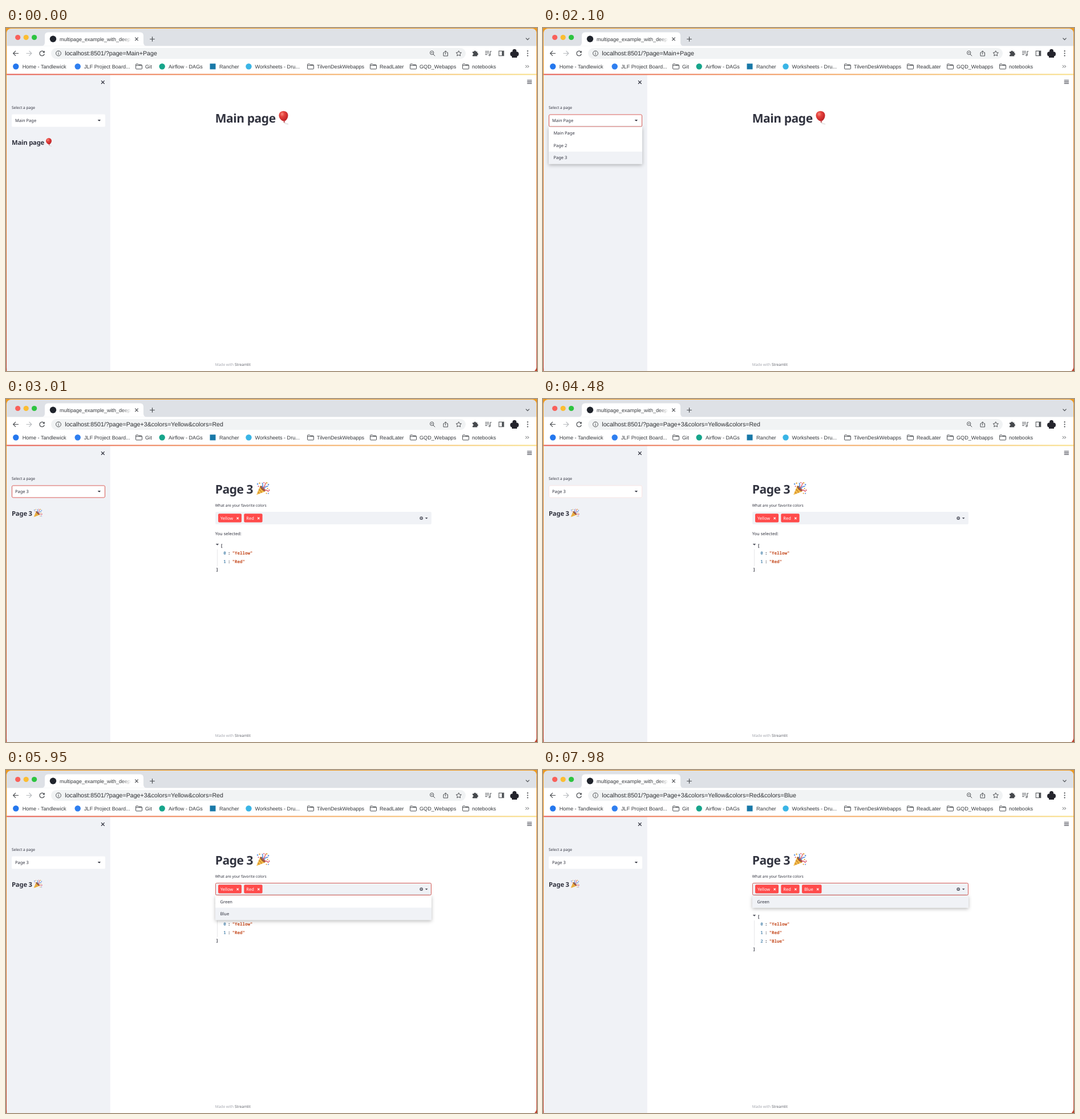
These frames come from a looping animation (931 px wide and 602 px high, 8 s). An HTML page:

```html
<!DOCTYPE html>
<html lang="en">
<head>
<meta charset="utf-8">
<title>Multipage app</title>
<style>
  html, body { margin: 0; width: 100%; height: 100%; overflow: hidden; }
  svg { display: block; width: 931px; height: 602px; }
  text { text-rendering: geometricPrecision; white-space: pre; }
  .chrome { font: 9.15px "Liberation Sans", sans-serif; fill: #36393d; }
  .page { font: 7.5px "Noto Sans", sans-serif; fill: #31333f; }
  .title, .subtitle { font-weight: 700; letter-spacing: -.02em; }
  .title { font-size: 21px; }
  .subtitle { font-size: 11.3px; }
  .label { font-size: 6.6px; }
  .tag { font-weight: 500; fill: #fff; }
  .json { font: 600 7.5px "Noto Sans Mono", monospace; }
  .icon { fill: none; stroke: #4b4e52; }
  .menu { filter: drop-shadow(0 2px 3px rgba(0, 0, 0, .27)); }
  .focus { fill: none; stroke: #d65b56; }
</style>
</head>
<body>
<svg viewBox="0 0 931 602">
  <defs>
    <linearGradient id="desktop" x2="0" y2="1">
      <stop stop-color="#eb9a24"/><stop offset=".6" stop-color="#dc742c"/><stop offset="1" stop-color="#bd3f2a"/>
    </linearGradient>
    <linearGradient id="stripe">
      <stop stop-color="#e65c52"/><stop offset=".5" stop-color="#f3a262"/><stop offset="1" stop-color="#f8e08a"/>
    </linearGradient>
    <linearGradient id="fade">
      <stop stop-color="#fff" stop-opacity="0"/><stop offset="1" stop-color="#fff"/>
    </linearGradient>
    <radialGradient id="rubber" cx=".35" cy=".3" r=".75">
      <stop stop-color="#f88a7c"/><stop offset=".35" stop-color="#e5413c"/><stop offset="1" stop-color="#b91f24"/>
    </radialGradient>
    <path id="folder" class="icon" d="M.6 1.6q0-1 1-1h2.9l1.3 1.500h4.700q1 0 1 1v5.400q0 1-1 1h-8.900q-1 0-1-1zM.6 3.200h10.500"/>
    <path id="cross" d="M-1 -1L1 1M1 -1L-1 1"/>
    <path id="caret" d="M-2.700 -1.300h5.400L0 1.500z" fill="#31333f"/>
    <g id="balloon">
      <path d="M1.300 9.600q-1 3 2.600 3.300t4.600 1" fill="none" stroke="#b9b4b2" stroke-width=".7"/>
      <path d="M1 8l2.200 2.400-3.300.2z" fill="#b3262a"/>
      <path d="M0-9.300C5-9.300 8-5.700 8-1.500 8 3.500 4 8.600 1 8.600-3 8.600-8 3.500-8-1.500-8-5.700-5-9.300 0-9.300z" fill="url(#rubber)"/>
    </g>
    <g id="popper">
      <path d="M.5 23.500L7 8q8 2 9 9.500z" fill="#f3bb48"/>
      <path d="M4.500 14q4 2 5 6M2.700 18.300q2 1 2.800 3.200" fill="none" stroke="#c9852c" stroke-width="1.300"/>
      <ellipse cx="11.500" cy="12.500" rx="6.300" ry="2.500" transform="rotate(46 11.500 12.500)" fill="#9c5a35"/>
      <path d="M10 11q3-4 .5-8.500M13 13q3-5 8-4.500" fill="none" stroke="#4f86d8" stroke-width="1.500"/>
      <path d="M11.500 12q4-3 5-9.500M14 15q4-1 8 3" fill="none" stroke="#dc5568" stroke-width="1.400"/>
      <g fill="#e0a63a"><circle cx="6" cy="3" r="1.200"/><circle cx="20" cy="12.500" r="1.100"/><path d="M18 1l2 1-1 2-2-1zM17 20l2 0 0 2-2-.5z"/></g>
      <g fill="#5a8fe0"><path d="M1 4l2-1 1 2-2 1zM21 4l2 1-1 2-2-1z"/><circle cx="21.500" cy="21" r="1"/></g>
      <g fill="#d9576b"><circle cx="13.500" cy="2" r="1"/><circle cx="4" cy="8.500" r="1"/><path d="M22 14l2 .5-.5 2-2-.5z"/></g>
    </g>
  </defs>

  <rect width="931" height="602" fill="url(#desktop)"/>
  <rect x="1.200" y="1.300" width="928.800" height="602" rx="8" fill="#fff"/>

  <g class="chrome">
    <path d="M1.200 31.500V9.300q0-8 8-8H922q8 0 8 8v22.200z" fill="#dee1e6"/>
    <circle cx="20.700" cy="16.500" r="4.600" fill="#f9605a"/>
    <circle cx="35.200" cy="16.500" r="4.600" fill="#fbbd31"/>
    <circle cx="49.600" cy="16.500" r="4.600" fill="#2dc440"/>
    <path d="M62 31.500q6 0 6-6V13.500q0-6 6-6H235q6 0 6 6v12q0 6 6 6z" fill="#fff"/>
    <circle cx="82.500" cy="19.200" r="5.700" fill="#20242c"/>
    <text x="94" y="22.500" font-size="9">multipage_example_with_deep</text>
    <rect x="203" y="12" width="17" height="14" fill="url(#fade)"/>
    <g class="icon" stroke-width="1.200">
      <path d="M226.300 16.700l5.400 5.400m0-5.400l-5.400 5.400M252.200 19.500h8.600m-4.300-4.300v8.600M911.500 17.700l3 3 3-3"/>
      <path d="M22 44.500h-9m4-4.300l-4.300 4.300 4.300 4.300"/>
      <path d="M35.500 44.500h9m-4-4.300l4.300 4.300-4.300 4.300" stroke="#b7babe"/>
      <path d="M66.700 42.200a4.200 4.200 0 1 0 .6 3.300"/>
      <path d="M67.800 39.800v3.700h-3.700z" fill="#45484c" stroke="none"/>
    </g>
    <rect x="79" y="35" width="727" height="19.300" rx="9.650" fill="#f1f3f4"/>
    <g class="icon">
      <circle cx="92" cy="44.500" r="4.400"/><path d="M92 43.800v3.200M92 41.700v1.200"/>
      <circle cx="746.700" cy="43.500" r="3.200"/><path d="M749 46l3.200 3.200M745.200 43.500h3"/>
      <path d="M769 43h-2v6h7.500v-6h-2M770.700 46.500v-6.500m-2 2l2-2 2 2"/>
      <path d="M793.700 39.900l1.400 3 3.300.4-2.400 2.300.6 3.300-2.900-1.600-2.900 1.600.6-3.300-2.400-2.300 3.300-.4z"/>
      <path d="M840 41h7m-7 2.800h7m-7 2.800h4M849 47.500v-6.500h2.200"/><circle cx="847.800" cy="47.500" r="1.300"/>
      <rect x="864.200" y="40.300" width="8.600" height="8.400"/>
    </g>
    <path d="M818 41.500h2.500a1.700 1.700 0 0 1 3.400 0h2.400v2.500a1.700 1.700 0 0 1 0 3.400v2.100h-8.300v-2.400a1.600 1.600 0 0 0 0-3.200z" fill="#45484c"/>
    <path d="M869.500 40.500h3v8h-3z" fill="#45484c"/>
    <g fill="#24242c"><circle cx="891.500" cy="40.500" r="3.500"/><path d="M884 45.500q0-4 4-4h7q4 0 4 4 0 4-3 4v2.500h-9v-2.500q-3 0-3-4z"/></g>
    <g fill="#45484c"><circle cx="914.600" cy="40.400" r="1.100"/><circle cx="914.600" cy="44.500" r="1.100"/><circle cx="914.600" cy="48.600" r="1.100"/></g>
    <text id="url" x="103.300" y="48.200" font-size="10.650" fill="#2c2e32"></text>

    <circle cx="17.300" cy="67.500" r="5.200" fill="#2477ee"/><text x="28.700" y="70.600">Home - Tandlewick</text>
    <circle cx="125.700" cy="67.500" r="5.200" fill="#2f7ff0"/><text x="137" y="70.600">JLF Project Board...</text>
    <use href="#folder" x="227" y="62.500"/><text x="244" y="70.600">Git</text>
    <circle cx="273.700" cy="67.500" r="5.200" fill="#17a58b"/><text x="285" y="70.600">Airflow - DAGs</text>
    <rect x="357.500" y="62.500" width="10" height="10" fill="#1878a8"/><text x="374" y="70.600">Rancher</text>
    <circle cx="425.500" cy="67.500" r="5.200" fill="#3ab5e6"/><text x="436.500" y="70.600">Worksheets - Dru...</text>
    <use href="#folder" x="528" y="62.500"/><text x="545" y="70.600">TilvenDeskWebapps</text>
    <use href="#folder" x="638" y="62.500"/><text x="655" y="70.600">ReadLater</text>
    <use href="#folder" x="708" y="62.500"/><text x="725" y="70.600">GQD_Webapps</text>
    <use href="#folder" x="800" y="62.500"/><text x="817" y="70.600">notebooks</text>
    <path class="icon" d="M911 65.300l2.200 2.200-2.200 2.200m3.300-4.400l2.200 2.200-2.200 2.200"/>
  </g>

  <g class="page">
    <path d="M1.200 82h181.600v520H1.200z" fill="#f0f2f6"/>
    <path d="M1.200 80.500H930v2H1.200z" fill="url(#stripe)"/>
    <use href="#cross" transform="translate(169.800 95.200) scale(2.800)" stroke="#31333f" stroke-width=".45"/>
    <path d="M913.700 91.700h8.200m-8.200 2.900h8.200m-8.200 2.900h8.200" stroke="#31333f" stroke-width="1.100"/>
    <text class="label" x="10" y="142.300">Select a page</text>
    <rect x="10" y="151.500" width="164" height="22" rx="2" fill="#fff"/>
    <rect id="selectFocus" class="focus" x="10.500" y="152" width="163" height="21" rx="2"/>
    <text id="selected" x="16" y="165"></text>
    <path id="selectCursor" d="M0 156v12" stroke="#31333f"/>
    <use href="#caret" x="163.400" y="162.200"/>
    <text class="label" x="366.700" y="593.300" fill="#a4a6ae">Made with <tspan fill="#62646d">Streamlit</tspan></text>

    <g id="mainPage">
      <text class="subtitle" x="10" y="204.700">Main page</text>
      <use href="#balloon" transform="translate(75 199) scale(.62)"/>
      <text class="title" x="366.700" y="165.600">Main page</text>
      <use href="#balloon" x="486.500" y="155"/>
    </g>

    <g id="colorPage">
      <text class="subtitle" x="10" y="204.700">Page 3</text>
      <use href="#popper" transform="translate(48.300 192) scale(.65)"/>
      <text class="title" x="366.700" y="165.600">Page 3</text>
      <use href="#popper" x="438.600" y="144.700"/>
      <text class="label" x="366.700" y="189">What are your favorite colors</text>
      <rect x="367" y="198" width="379" height="22" rx="2" fill="#f0f2f6"/>
      <rect id="multiFocus" class="focus" x="367.500" y="198.500" width="378" height="21" rx="2"/>
      <g id="tags"></g>
      <path id="multiCursor" d="M455.500 203v12" stroke="#31333f"/>
      <circle cx="728.200" cy="209.200" r="2.900" fill="#666873"/>
      <use href="#cross" transform="translate(728.200 209.200) scale(1.200)" stroke="#f0f2f6" stroke-width=".65"/>
      <use href="#caret" transform="translate(737.200 209.300) scale(.85)"/>
      <text x="366.700" y="238.500">You selected:</text>
      <path d="M367.800 254h5.400l-2.700 3z" fill="#555862"/>
      <path id="guide" stroke="#e6e6e8"/>
      <g class="json">
        <text x="375.800" y="259.500">[</text>
        <g id="values"></g>
        <text id="closing" x="368">]</text>
      </g>
      <g id="multiMenu" class="menu"></g>
    </g>

    <g id="pageMenu" class="menu"></g>
    <g id="running">
      <circle cx="825.500" cy="90" r="1.500" fill="#b9bbc1"/>
      <path d="M821.500 93h8M825.500 93v3m-1.500-2v6m3-6v6" stroke="#b9bbc1" stroke-width="1.600"/>
      <text x="836" y="96.400" font-size="6.400" fill="#b4b6bd">RUNNING...</text>
      <text x="883" y="96.900" font-size="7" fill="#6d6f7a">Stop</text>
    </g>
  </g>

  <g id="connecting" class="chrome">
    <path d="M0 603v-15h307q3 0 3 3v12z" fill="#dee1e6" stroke="#b2b5ba"/>
    <text x="5" y="598.500">Connecting...</text>
  </g>
</svg>

<script>
const el = Object.fromEntries([...document.querySelectorAll('svg [id]')].map(e => [e.id, e]));
const LOOP = 8000, STEP = 70;

const ramp = (t, from, to) => Math.min(1, Math.max(0, (t - from) / (to - from)));
const within = (t, ...spans) => spans.some(([from, to]) => t >= from && t < to);
const show = (id, opacity) => el[id].setAttribute('opacity', Number(opacity));

function menu(x, y, width, options, active) {
  const row = 21.6;
  return `<rect x="${x}" y="${y}" width="${width}" height="${row * options.length}" fill="#fff"/>` +
    options.map((option, i) =>
      (i === active ? `<rect x="${x}" y="${y + row * i}" width="${width}" height="${row}" fill="#f0f2f6"/>` : '') +
      `<text x="${x + 8.5}" y="${y + row * i + 13.5}">${option}</text>`).join('');
}

const tagShapes = { Yellow: [372, 41], Red: [417.3, 32.3], Blue: [454, 34.5] };
function tag(color) {
  const [x, width] = tagShapes[color];
  return `<rect x="${x}" y="201.300" width="${width}" height="15.300" rx="2" fill="#ff4b4b"/>
    <text class="tag" x="${x + 4}" y="211.800">${color}</text>
    <use href="#cross" transform="translate(${x + width - 6.8} 209.400) scale(1.700)" stroke="#fff" stroke-width=".6"/>`;
}

function jsonRow(color, i) {
  const y = 273 + 15 * i;
  return `<text x="381.300" y="${y}" fill="#5b8fb4">${i}</text><text x="389" y="${y}">:</text>
    <text x="396.500" y="${y}" fill="#c4481c">"${color}"</text>`;
}

function render(t) {
  const chosen = t >= 2240, onColors = t >= 2380, blueTag = t >= 6160, blueSaved = t >= 6300;
  const colors = ['Yellow', 'Red', 'Blue'];
  const saved = colors.slice(0, blueSaved ? 3 : 2);

  el.url.textContent = 'localhost:8501/?page=' + (t < 2310 ? 'Main+Page'
    : 'Page+3' + colors.slice(0, t >= 6230 ? 3 : 2).map(c => '&colors=' + c).join(''));

  el.selected.textContent = chosen ? 'Page 3' : 'Main Page';
  el.selectCursor.setAttribute('transform', `translate(${chosen ? 41.5 : 54.5})`);
  show('selectCursor', within(t, [770, 1260], [1680, 2100], [2240, 2730], [3290, 3780]));
  show('selectFocus', ramp(t, 630, 840) * (1 - ramp(t, 4270, 4520)));
  el.pageMenu.innerHTML = menu(10, 173.7, 164, ['Main Page', 'Page 2', 'Page 3'],
    t < 1400 ? 0 : t < 1610 ? 1 : 2);
  show('pageMenu', ramp(t, 630, 910) * (1 - ramp(t, 2170, 2310)));

  show('mainPage', !onColors);
  show('colorPage', onColors);
  el.tags.innerHTML = colors.slice(0, blueTag ? 3 : 2).map(tag).join('');
  el.values.innerHTML = saved.map(jsonRow).join('');
  el.closing.setAttribute('y', 272 + 15 * saved.length);
  el.guide.setAttribute('d', `M370.500 264v${15 * saved.length - 1}`);
  show('multiFocus', ramp(t, 5110, 5320));
  show('multiCursor', within(t, [5320, 5950]));
  el.multiMenu.innerHTML = menu(367, 220, 379, blueTag ? ['Green'] : ['Green', 'Blue'],
    !blueTag && t >= 5670 ? 1 : 0);
  show('multiMenu', ramp(t, 5110, 5320));

  show('running', t < 5000 ? .35 * ramp(t, 2240, 2310) * (1 - ramp(t, 2520, 2660))
    : .35 * ramp(t, 6160, 6230) * (1 - ramp(t, 6300, 6440)));
  show('connecting', within(t, [2310, 2590]));
}

function tick() {
  const t = performance.now() % LOOP;
  render(Math.floor(t / STEP) * STEP);
  requestAnimationFrame(tick);
}
tick();
</script>
</body>
</html>
```
